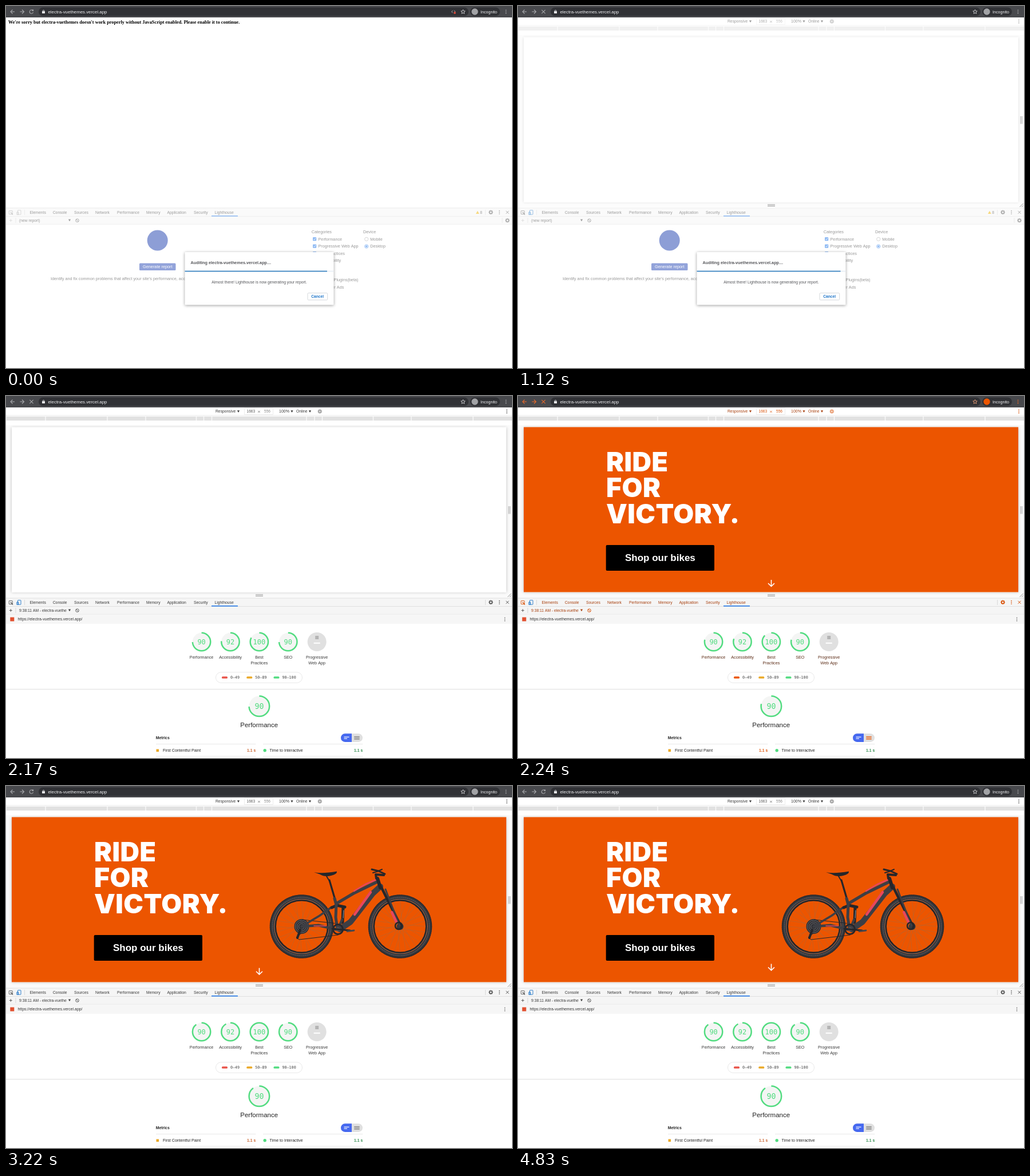
An HTML page with a canvas for the animation above (4.9 s loop, 884 px wide and 634 px high).

```html
<!DOCTYPE html>
<html lang="en">
<head>
<meta charset="utf-8">
<title>Audit run</title>
<style>
html, body { margin: 0; width: 100%; height: 100%; overflow: hidden; background: #fff; }
canvas { display: block; }
</style>
</head>
<body>
<canvas id="stage" width="884" height="634"></canvas>
<script>
const c = document.getElementById('stage').getContext('2d');
const SANS = '"Liberation Sans", Arial, sans-serif';
const SERIF = '"Liberation Serif", Times, serif';
const MONO = '"DejaVu Sans Mono", monospace';
const HEAVY = 'Inter, "Liberation Sans", sans-serif';
const LOOP = 4900, TAU = Math.PI * 2;
const SITE = 'electra-vuethemes.vercel.app';
const GREEN = '#52dc80', ORANGE = '#ec5500', BLUE = '#1a73c8';

// Key moments, ms
const EMULATE = 980, REPORT = 1470, GAUGE = 1540, HERO = 2240, BIKE = 2450;
const STATUS = [2520, 2870];

let ink, icon, label;

function text(s, x, y, size, color, o = {}) {
  c.font = `${o.weight || 400} ${size}px ${o.font || SANS}`;
  c.textAlign = o.align || 'left';
  c.fillStyle = color;
  c.fillText(s, x, y + size * 0.345);
}
function box(x, y, w, h, color, r = 0) {
  c.fillStyle = color;
  c.beginPath();
  c.roundRect(x, y, w, h, r);
  c.fill();
}
function frame(x, y, w, h, color, r = 0, width = 1) {
  c.strokeStyle = color;
  c.lineWidth = width;
  c.beginPath();
  c.roundRect(x, y, w, h, r);
  c.stroke();
}
function line(points, color, width = 1) {
  c.strokeStyle = color;
  c.lineWidth = width;
  c.beginPath();
  for (let i = 0; i < points.length; i += 2) c.lineTo(points[i], points[i + 1]);
  c.stroke();
}
function disc(x, y, r, color) {
  c.fillStyle = color;
  c.beginPath();
  c.arc(x, y, r, 0, TAU);
  c.fill();
}
function ring(x, y, r, color, width, from = 0, to = TAU) {
  c.strokeStyle = color;
  c.lineWidth = width;
  c.beginPath();
  c.arc(x, y, r, from, to);
  c.stroke();
}
function caret(x, y, color) {
  c.fillStyle = color;
  c.beginPath();
  c.moveTo(x - 2.1, y - 1.7);
  c.lineTo(x + 2.1, y - 1.7);
  c.lineTo(x, y + 1.9);
  c.fill();
}
function dots(x, y, color) {
  for (const d of [-2.7, 0, 2.7]) disc(x, y + d, 0.85, color);
}
function cross(x, y, r, color, width = 1) {
  line([x - r, y - r, x + r, y + r], color, width);
  line([x + r, y - r, x - r, y + r], color, width);
}
function gear(x, y, color) {
  ring(x, y, 2.3, color, 1.6);
  for (let i = 0; i < 8; i++) {
    const a = i * TAU / 8, u = Math.cos(a), v = Math.sin(a);
    line([x + u * 2.5, y + v * 2.5, x + u * 3.8, y + v * 3.8], color, 1.4);
  }
}
function ban(x, y, color) {
  ring(x, y, 2.8, color, 1);
  line([x - 2, y - 2, x + 2, y + 2], color, 1);
}
function plus(x, y, color) {
  line([x - 2.5, y, x + 2.5, y], color, 0.9);
  line([x, y - 2.5, x, y + 2.5], color, 0.9);
}

// CSS "ease" timing curve
function ease(p) {
  if (p <= 0) return 0;
  if (p >= 1) return 1;
  let lo = 0, hi = 1, u;
  for (let i = 0; i < 20; i++) {
    u = (lo + hi) / 2;
    const x = 0.75 * u * (1 - u) * (1 - u) + 0.75 * u * u * (1 - u) + u ** 3;
    if (x < p) lo = u; else hi = u;
  }
  return 0.3 * u * (1 - u) * (1 - u) + 3 * u * u * (1 - u) + u ** 3;
}

function browserBar(t, tint) {
  const nav = tint ? '#e8692a' : '#a6a7aa';
  box(0, 0, 884, 20, '#48494d');
  box(57, 2.5, 751, 15, '#303135', 7.5);
  box(811, 2.5, 52, 15, '#303135', 7.5);
  line([15, 10, 8, 10], nav, 1.1);
  line([11.5, 6.5, 8, 10, 11.5, 13.5], nav, 1.1);
  line([24.5, 10, 31.5, 10], nav, 1.1);
  line([28, 6.5, 31.5, 10, 28, 13.5], nav, 1.1);
  if (t >= EMULATE && t < BIKE) cross(44.5, 10, 3.1, nav, 1.1);
  else {
    ring(44.5, 10, 3.2, nav, 1.1, 0.3, 5.5);
    box(45.5, 6.3, 2.6, 2.6, nav);
  }
  box(63, 9, 5, 4, '#e8e8ea', 0.6);
  ring(65.5, 8.8, 1.5, '#e8e8ea', 0.9, Math.PI, TAU);
  text(SITE, 73.5, 10, 7.85, '#f0f0f2');
  if (t < EMULATE) {
    line([780.5, 7.8, 778.5, 10, 780.5, 12.2], '#bbb', 0.9);
    line([783, 7.8, 785, 10], '#bbb', 0.9);
    disc(784, 12, 1.9, '#d94a3d');
  }
  c.beginPath();
  for (let i = 0; i < 10; i++) {
    const a = -Math.PI / 2 + i * Math.PI / 5, r = i % 2 ? 1.8 : 3.9;
    c.lineTo(798.5 + r * Math.cos(a), 10.2 + r * Math.sin(a));
  }
  c.closePath();
  c.lineWidth = 0.9;
  c.strokeStyle = tint ? '#f0a078' : '#d4d4d6';
  c.stroke();
  disc(819, 10, 5.7, tint ? ORANGE : '#a2a3a6');
  text('Incognito', 829, 10.2, 7.15, '#f0f0f2');
  dots(873.5, 10, nav);
}

function deviceBar() {
  box(0, 20, 884, 334, '#fafafa');
  box(0, 20, 884, 15, '#fff');
  line([0, 34, 884, 34], '#e3e3e3', 0.8);
  text('Responsive', 366, 27, 6.75, ink);
  caret(406, 27, ink);
  frame(416.5, 21, 50, 11.5, '#e6e6e6', 0, 0.7);
  text('1663', 420.5, 27, 6.6, icon);
  cross(442, 27.5, 1.7, icon, 0.7);
  text('556', 451, 27, 6.6, label === ink ? '#888' : icon);
  text('100%', 477, 27, 7, ink);
  caret(499.5, 27, ink);
  text('Online', 507, 27, 6.75, ink);
  caret(531, 27, ink);
  ring(548.3, 27, 3, icon, 0.8);
  frame(547, 25.7, 2.6, 2.6, icon, 0, 0.6);
  dots(875, 27, icon);
  box(1, 36, 883, 7, '#e1e1e1');
  for (const x of [69, 177, 244, 332.5, 345.5, 359.5, 525, 539, 552.5, 641.5, 708, 816])
    box(x - 0.7, 36, 1.4, 7, '#fafafa');
  box(0, 43, 884, 8, '#fff');
  c.save();
  c.shadowColor = 'rgba(0,0,0,.25)';
  c.shadowBlur = 5;
  box(10, 54.5, 864, 289.5, '#fff');
  c.restore();
}

function handles() {
  for (const x of [878.2, 880.6]) line([x, 193, x, 206.5], '#999', 0.9);
  for (const y of [348, 350.4]) line([436, y, 449, y], '#888', 0.9);
  line([876.5, 352, 882.5, 346], '#888', 0.9);
  line([880, 352, 882.5, 349.5], '#888', 0.9);
}

function wheel(x, y) {
  c.save();
  c.translate(x, y);
  for (let i = 0; i < 28; i++) {
    const a = i * TAU / 28, b = a + (i % 2 ? 0.6 : -0.6);
    line([6 * Math.cos(b), 6 * Math.sin(b), 45 * Math.cos(a), 45 * Math.sin(a)], '#a8693e', 0.5);
  }
  ring(0, 0, 51.5, '#37373b', 7);
  c.setLineDash([2.2, 1.4]);
  ring(0, 0, 54.8, '#2c2c30', 2);
  ring(0, 0, 51, '#55555a', 1.2);
  c.setLineDash([]);
  ring(0, 0, 46, '#242428', 3);
  ring(0, 0, 47.6, '#85858a', 0.6);
  disc(0, 0, 6, '#38383c');
  c.restore();
}

function bike() {
  const dark = '#3d3e44', black = '#26262a', pink = '#e8475c';
  c.save();
  c.lineCap = c.lineJoin = 'round';
  wheel(516.5, 246);
  wheel(688.5, 246);
  // drivetrain
  disc(516.5, 246, 13, '#303034');
  for (const r of [5, 8, 11]) ring(516.5, 246, r, '#77777c', 0.8);
  line([516, 258, 507, 265, 512, 269, 580, 261], black, 1);
  line([514, 252, 509, 266], black, 4);
  line([517, 234, 579, 241], black, 1);
  // rear triangle
  line([516.5, 246, 546, 244, 580, 252], dark, 4.5);
  line([516.5, 246, 548, 227, 569, 212], dark, 3.6);
  line([538, 245, 559, 245], pink, 1.6);
  line([569, 213, 578, 209, 592, 212], black, 5);
  line([589, 212, 588, 239], black, 5);
  line([590, 218, 589, 231], '#77777c', 1.5);
  line([587, 234, 581, 248], dark, 4);
  // main frame
  line([565, 165, 577, 206], black, 3.2);
  line([574, 197, 577, 208, 576, 230, 579, 250], dark, 5);
  line([577, 206, 609, 187, 650, 167], dark, 5.5);
  line([608, 184, 628, 172, 648, 163.5], pink, 2.6);
  line([654, 176, 641, 188, 602, 238, 583, 251], dark, 10);
  line([609, 225, 637, 186], pink, 4.5);
  // saddle
  line([560, 158, 566, 168], black, 2);
  c.fillStyle = black;
  c.beginPath();
  c.moveTo(538, 151);
  c.quadraticCurveTo(552, 154, 578, 149.5);
  c.quadraticCurveTo(579, 154, 568, 157);
  c.quadraticCurveTo(557, 160, 548, 154.5);
  c.fill();
  // fork and bars
  line([649, 162, 654, 178], black, 6);
  line([656, 178, 667, 200, 690, 246], black, 4.5);
  line([663, 181, 672, 205, 688, 245], dark, 3);
  line([674, 221, 682, 238], pink, 4.5);
  ring(686, 245, 6, black, 2.5);
  line([647, 162, 646, 155, 660, 156], black, 4);
  line([639, 146, 651, 149, 662, 154], black, 3);
  line([641, 152, 648, 150, 657, 146], black, 2);
  // crank
  ring(580, 251, 8.5, black, 3);
  disc(580, 251, 3.5, '#55555a');
  line([580, 251, 601, 253], black, 3);
  line([596, 254.5, 608, 253], '#46464b', 2.8);
  line([580, 251, 570, 250], black, 3);
  c.restore();
}

function hero(t) {
  box(10, 54.5, 864, 289, ORANGE);
  c.letterSpacing = '0.4px';
  ['RIDE', 'FOR', 'VICTORY.'].forEach((word, i) =>
    text(word, 154, 115.5 + i * 45.6, 46.5, '#fff', { weight: 900, font: HEAVY }));
  c.letterSpacing = '0px';
  box(153.7, 261, 189.3, 45, '#000', 2);
  text('Shop our bikes', 187, 283.2, 17, '#fff', { weight: 700 });
  if (t >= BIKE) bike();
  const p = Math.min(1, (t - HERO) / 2600);
  const y = 328 - 5.25 * (1 - Math.cos(Math.PI * p));
  line([442.5, y - 6, 442.5, y + 5.3], '#fff', 1.6);
  line([437, y, 442.5, y + 5.4, 448, y], '#fff', 1.6);
  if (t >= STATUS[0] && t < STATUS[1]) {
    box(10, 333.7, 286.5, 10, '#4b4b4e', [0, 2, 0, 0]);
    text('Waiting for ' + SITE + '...', 13, 338.5, 6.63, '#d8d8da');
  }
}

function toolTabs(t, busy) {
  box(0, 353.5, 884, 281, '#fff');
  box(0, 354, 884, 28, '#f5f5f5');
  for (const y of [354, 368.5, 382.3]) line([0, y, 884, y], '#d6d6d6', 0.7);
  c.globalAlpha = t < EMULATE ? 0.55 : 1;
  frame(5.3, 358.6, 6, 6, icon, 0.6, 0.9);
  line([8, 361, 12, 365.5], icon, 1.3);
  const emu = t < EMULATE ? '#777' : BLUE;
  frame(20.5, 357.7, 5.5, 7.5, emu, 0.5, 0.9);
  frame(18.7, 361, 3.2, 4.4, emu, 0.3, 0.9);
  c.globalAlpha = 1;
  line([32.5, 357, 32.5, 366], '#ccc', 0.7);
  const tabs = { Elements: 41.5, Console: 81.7, Sources: 119, Network: 156, Performance: 194,
    Memory: 245, Application: 281.5, Security: 328, Lighthouse: 364.5 };
  for (const name in tabs) text(name, tabs[name], 361.5, 6.8, ink);
  box(359, 367, 46, 1.5, '#1a73e8');
  line([837.5, 357, 837.5, 366], '#ccc', 0.7);
  gear(847, 361.3, icon);
  dots(862, 361.3, icon);
  cross(876, 361.3, 2.5, icon, 1);
  plus(8.3, 375.5, busy ? '#bbb' : '#555');
  line([17, 371, 17, 380], '#ccc', 0.7);
  text(busy ? '(new report)' : '9:38:11 AM - electra-vuethe', 23, 375.6, 6.75, ink);
  caret(111, 375.3, ink);
  ban(124.5, 375.6, icon);
  if (!busy) return;
  c.fillStyle = '#f0b400';
  c.beginPath();
  c.moveTo(823.8, 358.8);
  c.lineTo(826.7, 364);
  c.lineTo(820.9, 364);
  c.fill();
  text('8', 828.3, 361.5, 6.6, ink);
  line([867, 371, 867, 380], '#ccc', 0.7);
  gear(876, 375.5, icon);
}

function check(name, y) {
  box(536, y - 3, 6.2, 6.2, '#1a73e8', 1);
  line([537.3, y, 538.7, y + 1.5, 541, y - 1.5], '#fff', 0.9);
  text(name, 545.5, y, 7.28, '#333');
}

function startPanel() {
  disc(264.7, 410.5, 18, '#1b3cae');
  box(233, 450.5, 63.5, 12.5, '#2546b5', 1.5);
  text('Generate report', 264.8, 456.8, 7.29, '#fff', { align: 'center' });
  text("Identify and fix common problems that affect your site's performance, accessibility, and user experience.",
    78, 477.2, 7.28, '#333');
  text('Categories', 533.8, 395, 7.28, '#333');
  ['Performance', 'Progressive Web App', 'Best Practices', 'Accessibility', 'SEO'].forEach((name, i) =>
    check(name, 408 + i * 12.5));
  text('Community Plugins(beta)', 533.8, 479.2, 7.28, '#333');
  check('Publisher Ads', 492);
  text('Device', 624, 395, 7.28, '#333');
  ring(629.7, 408.3, 3.1, '#999', 0.8);
  ring(629.7, 421, 3.1, '#1a73e8', 0.9);
  disc(629.7, 421, 1.8, '#1a73e8');
  text('Mobile', 636.3, 408, 7.28, '#333');
  text('Desktop', 636.3, 420.7, 7.28, '#333');
}

function dialog(t) {
  c.save();
  c.shadowColor = 'rgba(0,0,0,.4)';
  c.shadowBlur = 5;
  c.shadowOffsetY = 1;
  box(312.5, 431, 260, 92.5, '#fff', 1);
  c.restore();
  text(`Auditing ${SITE}…`, 322.5, 449.2, 7.29, '#55565a', { weight: 700 });
  box(312.5, 463.8, 260, 1.4, '#e4ecf4');
  box(312.5, 463.8, 248.5 + Math.min(2.7, t * 0.0022), 1.4, '#2173b9');
  text('Almost there! Lighthouse is now generating your report.', 442.3, 483.6, 6.78, '#55565a', { align: 'center' });
  frame(527, 502.7, 34.7, 12.2, '#d0d4d9', 1.5, 0.9);
  text('Cancel', 544.2, 508.9, 6.65, BLUE, { weight: 700, align: 'center' });
}

function gauge(x, y, r, score, size, t) {
  disc(x, y, r, '#f4f5f4');
  const part = score / 100 * ease((t - GAUGE) / 1200);
  if (part > 0) ring(x, y, r, GREEN, 2.5, -Math.PI / 2, -Math.PI / 2 + TAU * part);
  text(score, x, y + 0.4, size, GREEN, { font: MONO, align: 'center' });
}

function report(t, tint) {
  box(0, 382.6, 884, 16.4, '#f6f6f6');
  box(7.3, 387.5, 7, 7, '#e2502f');
  text(`https://${SITE}/`, 20.5, 391, 6.9, '#333');
  dots(871.5, 391, '#777');
  const scores = [[90, 'Performance'], [92, 'Accessibility'], [100, 'Best', 'Practices'], [90, 'SEO']];
  scores.push([null, 'Progressive', 'Web App']);
  scores.forEach(([score, ...words], i) => {
    const x = 341.6 + i * 50.4;
    if (score) gauge(x, 430.5, 15.7, score, 12, t);
    else {
      disc(x, 430.5, 16.5, '#e0e0e0');
      box(x - 3, 420, 6, 6, '#b4b4b4');
      box(x - 5.5, 431.8, 11, 2, '#fff', 0.5);
    }
    words.forEach((w, k) => text(w, x, 457.5 + k * 10.3, 7.28, label, { align: 'center' }));
  });
  frame(366.5, 483.8, 151, 18.5, '#e2e2e2', 9.2, 0.8);
  const red = tint ? ORANGE : '#e9544a';
  [[377, red, '0–49'], [420.3, '#eba927', '50–89'], [467.5, GREEN, '90–100']].forEach(([x, color, s]) => {
    box(x, 491.2, 10, 3.5, color, 1.5);
    text(s, x + 15, 493, 6.7, '#444', { font: MONO });
  });
  line([0, 513.6, 884, 513.6], '#d4d4d4', 0.8);
  gauge(442.4, 543.3, 17.8, 90, 13.3, t);
  text('Performance', 442.2, 576.2, 11.5, '#222', { align: 'center' });
  text('Metrics', 261.7, 598.6, 6.86, '#222', { weight: 700 });
  box(585, 591.3, 38, 14.7, '#e0e0e0', 7.3);
  box(585, 591.3, 19, 14.7, '#4669f0', [7.3, 0, 0, 7.3]);
  box(590.5, 596.7, 9, 1.2, '#fff');
  box(590.5, 599.4, 5.5, 1.2, '#fff');
  for (const y of [596, 598.3, 600.6]) box(608.2, y, 9.5, 1.1, tint ? ORANGE : '#777');
  for (const x of [262, 449])
    for (const y of [609.7, 631]) line([x, y, x + 174.5, y], '#e0e0e0', 0.8);
  box(262.5, 618.5, 4.6, 4.6, '#eba927');
  text('First Contentful Paint', 274, 621, 7.1, '#222');
  text('1.1 s', 436.2, 621, 6.8, tint ? '#e05508' : '#c9602a', { weight: 700, align: 'right' });
  disc(452.2, 620.7, 2.7, GREEN);
  text('Time to Interactive', 460.6, 621, 7.1, '#222');
  text('1.1 s', 623.2, 621, 6.8, '#2c8a4b', { weight: 700, align: 'right' });
}

function draw(t) {
  const busy = t < REPORT, tint = t >= HERO && t < BIKE;
  ink = tint ? '#a8400f' : '#3a3a3a';
  icon = tint ? '#d9540c' : '#5c5c5c';
  label = tint ? '#5c2c16' : '#3a3a3a';
  box(0, 0, 884, 634, '#fff');
  if (t < EMULATE) {
    text("We're sorry but electra-vuethemes doesn't work properly without JavaScript enabled. Please enable it to continue.",
      4, 28.5, 8.3, '#000', { weight: 700, font: SERIF });
  } else deviceBar();
  browserBar(t, tint);
  if (t >= HERO) hero(t);
  toolTabs(t, busy);
  if (busy) {
    startPanel();
    const top = t < EMULATE ? 354 : 20;
    box(0, top, 884, 634 - top, 'rgba(255,255,255,.5)');
    dialog(t);
  } else report(t, tint);
  if (t >= EMULATE) handles();
}

const start = performance.now();
function tick() {
  draw((performance.now() - start) % LOOP);
  requestAnimationFrame(tick);
}
tick();
</script>
</body>
</html>
```
